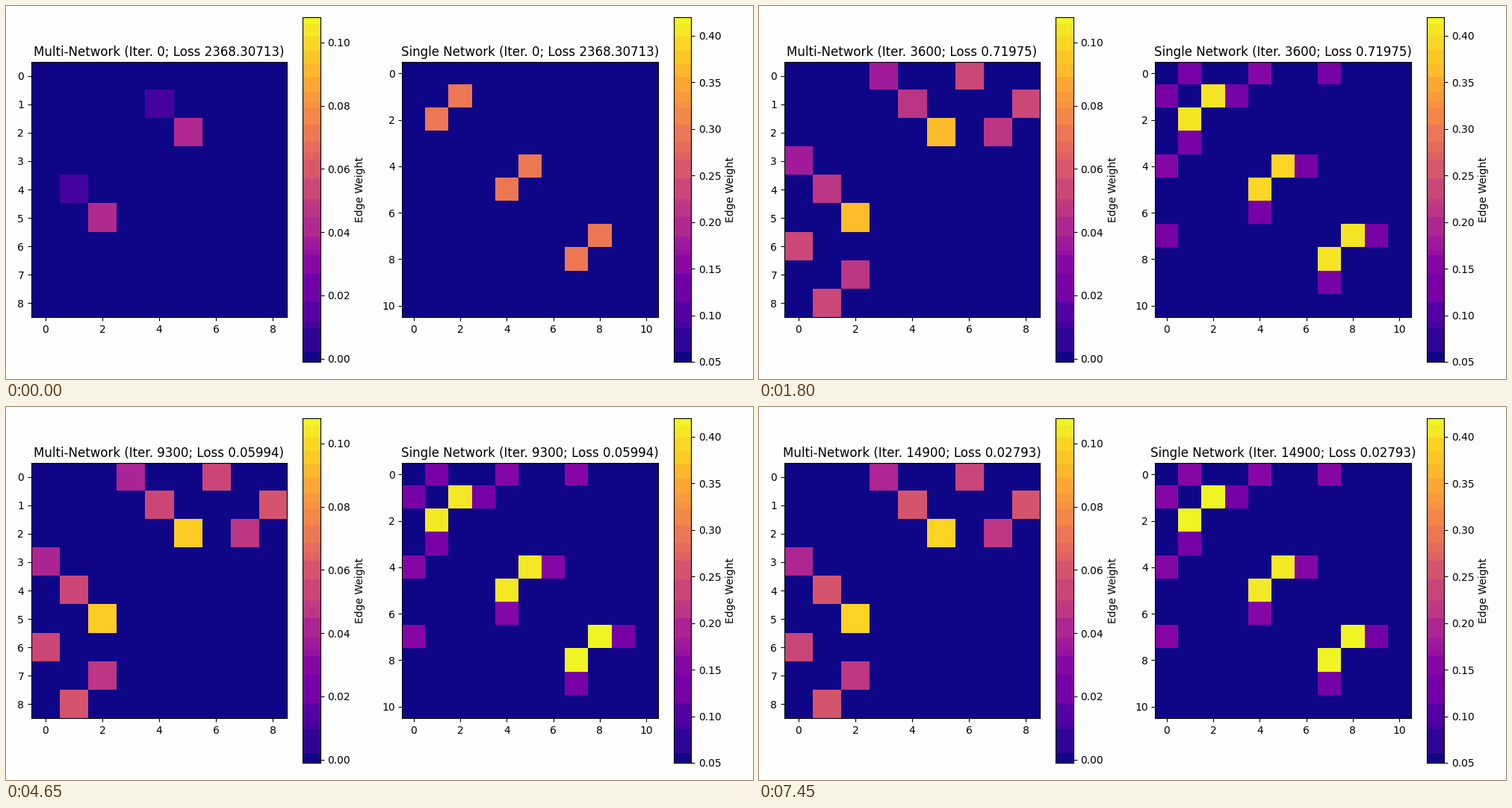
Animation, 1000 px wide and 500 px high, one loop 7.5 s. Source, as a matplotlib script:

```python
import numpy as np
import matplotlib.pyplot as plt
from matplotlib.animation import FuncAnimation

W, H, DPI = 1000, 500, 100
FRAMES, INTERVAL = 150, 50
SIDE, TOP = 342.2, 74.9
BAR_W, BAR_H, BAR_TOP = 23.1, 462, 15
plt.rcParams["font.family"] = "DejaVu Sans"

# Key points of the falling loss, joined on a log scale
LOSS_AT = [0, 18, 36, 59, 93, 121, 149]
LOSS = [2368.30713, 9.83616, 0.71975, 0.13029, 0.05994, 0.03817, 0.02793]

# Each edge: start weight, end weight, share of the slow drift
MULTI = {
    (0, 3): (0, 0.0418, 0.22),
    (0, 6): (0, 0.0525, 0.05),
    (1, 4): (0.0105, 0.059, 0.5),
    (1, 8): (0, 0.059, 0.1),
    (2, 5): (0.043, 0.099, 0.22),
    (2, 7): (0, 0.0482, 0.05),
}
# Three modules, each a hub joined to the root, a partner and a leaf
SINGLE = {}
for hub, root, partner, leaf, slow in [(1, 0.1472, 0.413, 0.140, 0.22),
                                       (4, 0.1565, 0.409, 0.149, 0.30),
                                       (7, 0.1515, 0.423, 0.140, 0.28)]:
    SINGLE[0, hub] = (0, root, 0.1)
    SINGLE[hub, hub + 1] = (0.296, partner, slow)
    SINGLE[hub, hub + 2] = (0, leaf, 0.1)

# Plasma reduced to a coarse RGB grid: every grid cell shows its mean colour
lut = plt.get_cmap("plasma")(np.arange(256))[:, :3] * 255
shades = np.vstack([lut.astype(int), np.rint(lut).astype(int)])
grid = (shades >> [5, 4, 5]) @ [1024, 32, 1]
group = np.unique(grid, return_inverse=True)[1].ravel()
BAR_AREA = 2 * 22 * BAR_H / 256


def reduce_colors(cell_area):
    """Return the reduced colours for the cells and for the bars."""
    weight = np.concatenate([cell_area, np.full(256, BAR_AREA)])
    total = np.bincount(group, weight)
    mean = np.stack([np.bincount(group, weight * c) / total for c in shades.T],
                    axis=1)
    colors = np.floor(mean + 1e-6).astype(np.uint8)[group]
    return colors[:256], colors[256:]


def weight_at(n, start, end, slow):
    """Settle from start to end: a quick jump, then a slow drift."""
    rest = (1 - slow) * np.exp(-n / 5) + slow * np.exp(-n / 50)
    return end + (start - end) * rest


def add_box(fig, x, y, w, h):
    return fig.add_axes([x / W, 1 - (y + h) / H, w / W, h / H])


class Panel:
    def __init__(self, fig, name, left, size, edges, vmin, vmax, ticks, yticks):
        self.name, self.size, self.edges = name, size, edges
        self.vmin, self.vmax = vmin, vmax
        self.area = (SIDE / size) ** 2
        ax = add_box(fig, left, TOP, SIDE, SIDE)
        self.image = ax.imshow(np.zeros((size, size, 3), np.uint8),
                               interpolation="nearest", aspect="auto")
        ax.set_xticks(range(0, size, 2))
        ax.set_yticks(yticks)
        self.title = ax.set_title("")

        cax = add_box(fig, left + SIDE * 0.85 / 0.8, BAR_TOP, BAR_W, BAR_H)
        self.bar = cax.imshow(np.zeros((256, 1, 3), np.uint8), origin="lower",
                              extent=(0, 1, vmin, vmax), aspect="auto",
                              interpolation="nearest")
        cax.set_xticks([])
        cax.yaxis.tick_right()
        cax.yaxis.set_label_position("right")
        cax.set_yticks(ticks, [f"{t:.2f}" for t in ticks])
        cax.set_ylabel("Edge Weight")

    def levels(self, n):
        m = np.zeros((self.size, self.size))
        for (i, j), edge in self.edges.items():
            m[i, j] = m[j, i] = weight_at(n, *edge)
        t = (m - self.vmin) / (self.vmax - self.vmin)
        return np.clip((t * 256).astype(int), 0, 255)

    def show(self, levels, cells, bar, n, loss):
        self.image.set_data(cells[levels])
        self.bar.set_data(bar[:, None, :])
        self.title.set_text(f"{self.name} (Iter. {100 * n}; Loss {loss:.5f})")


fig = plt.figure(figsize=(W / DPI, H / DPI), dpi=DPI, facecolor="#fefefe")
panels = [
    Panel(fig, "Multi-Network", 33.85, 9, MULTI, -0.001, 0.108,
          np.arange(6) * 0.02, range(9)),
    Panel(fig, "Single Network", 530.35, 11, SINGLE, 0.05, 0.42,
          np.arange(1, 9) * 0.05, range(0, 11, 2)),
]


def draw(n):
    loss = np.exp(np.interp(n, LOSS_AT, np.log(LOSS)))
    levels = [p.levels(n) for p in panels]
    area = sum(np.bincount(lv.ravel(), minlength=256) * p.area
               for p, lv in zip(panels, levels))
    cells, bar = reduce_colors(area)
    for p, lv in zip(panels, levels):
        p.show(lv, cells, bar, n, loss)
    return []


anim = FuncAnimation(fig, draw, frames=FRAMES, interval=INTERVAL,
                     init_func=lambda: draw(0), repeat=True, repeat_delay=0)
plt.show()
```
